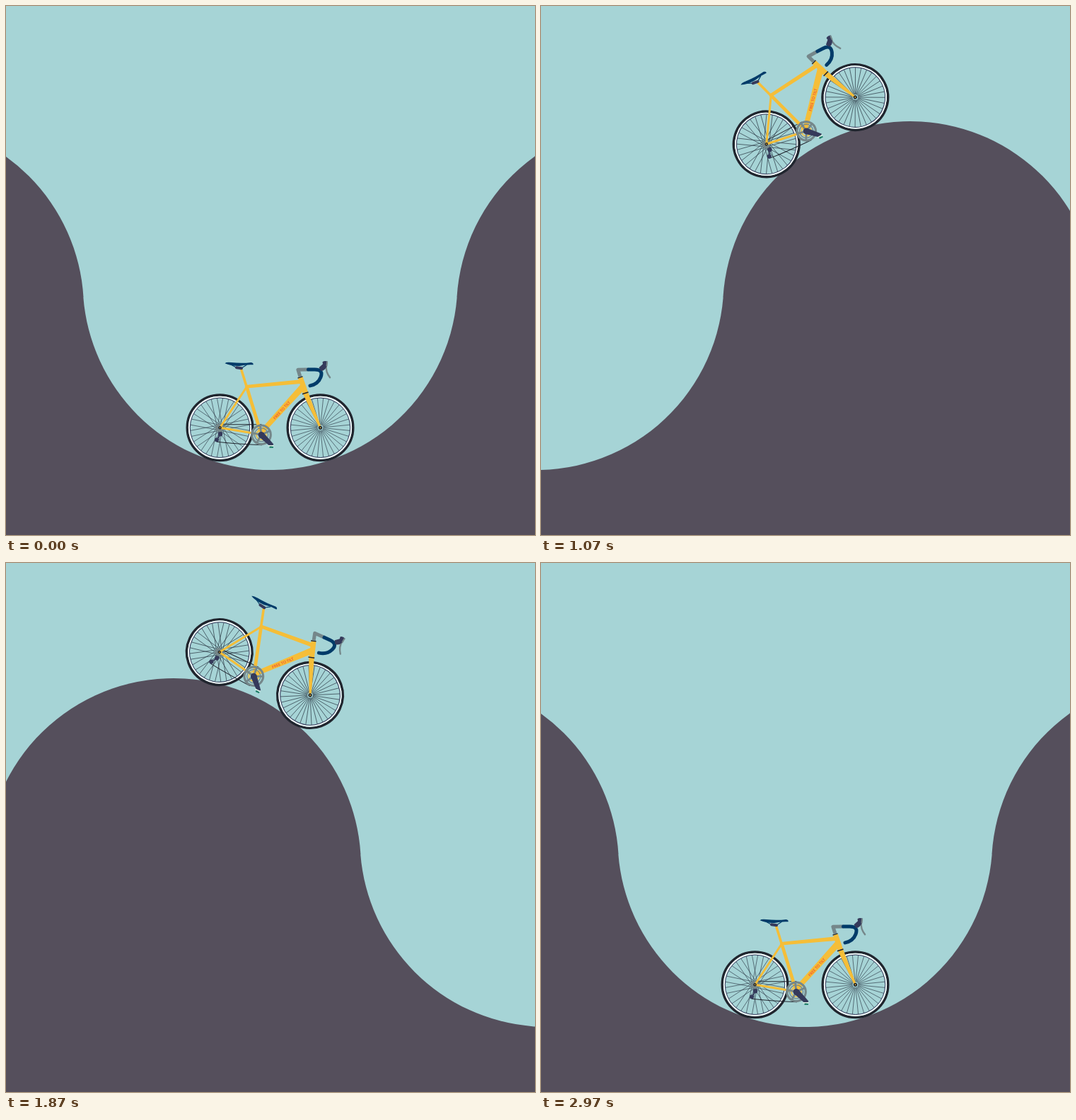
Write an HTML page with a canvas that moves like this. It is 748x748 px and loops after 3.03 s.

```html
<!DOCTYPE html>
<html lang="en">
<head>
<meta charset="utf-8">
<title>Bike on the hills</title>
<style>
html, body { margin: 0; width: 100%; height: 100%; overflow: hidden; background: #a6d4d6; }
canvas { display: block; width: 748px; height: 748px; }
</style>
</head>
<body>
<canvas id="stage" width="748" height="748"></canvas>
<script>
const ctx = document.getElementById('stage').getContext('2d');
const SIZE = 748, LOOP = 3030, LAST = 89, PERIOD = 1057, TAU = Math.PI * 2;
const SKY = '#a6d4d6', GROUND = '#554f5c', TYRE = '#20252e', YELLOW = '#f5be38';
const NAVY = '#003b69', GREY = '#75878a', INK = '#353a5b';

// Ground: hill and valley arcs meeting at SEAM
const RADIUS = 265, VALLEY_X = 373.5, VALLEY_Y = 391, HILL_Y = 428, SEAM = 412;

// Track followed by the wheel hubs
const LOW_R = 217.2, HIGH_R = 309, TURN = Math.atan2(PERIOD / 2, HILL_Y - VALLEY_Y);
const LOW_LEN = LOW_R * TURN, HALF = (LOW_R + HIGH_R) * TURN, TRACK = HALF * 2;
const AXLE = 72.3;

// [step, distance along the track]
const KEYS = [[-10, -172.4], [0, 0], [11, 174.5], [22, 495.2], [32, 639.6], [46, 804.3],
  [57, 940], [67, 1084.4], [79, 1407.2], [LAST, TRACK], [100, TRACK + 174.5]];

function slope(i) {
  const a = KEYS[i - 1], b = KEYS[i + 1];
  return (b[1] - a[1]) / (b[0] - a[0]);
}

function distance(n) {
  let i = 1;
  while (i < KEYS.length - 3 && n > KEYS[i + 1][0]) i++;
  const [n0, s0] = KEYS[i], [n1, s1] = KEYS[i + 1];
  const w = n1 - n0, u = (n - n0) / w, v = 1 - u;
  return s0 * v * v * (1 + 2 * u) + s1 * u * u * (3 - 2 * u)
    + w * u * v * (slope(i) * v - slope(i + 1) * u);
}

function hubAt(s, lift) {
  const k = Math.round(s / TRACK), d = s - k * TRACK;
  const side = Math.sign(d), len = Math.abs(d), x = VALLEY_X + k * PERIOD;
  if (len < LOW_LEN) {
    const a = len / LOW_R, r = LOW_R - (k > 0 ? lift * (2.4 + 3.5 * a) : 0);
    return [x + side * r * Math.sin(a), VALLEY_Y + r * Math.cos(a)];
  }
  const a = (HALF - len) / HIGH_R, r = HIGH_R + 3.7 * (a / TURN) ** 6;
  return [x + side * (PERIOD / 2 - r * Math.sin(a)), HILL_Y - r * Math.cos(a)];
}

function disc(x, y, r, color) {
  ctx.fillStyle = color;
  ctx.beginPath();
  ctx.arc(x, y, r, 0, TAU);
  ctx.fill();
}

function ring(x, y, r, width, color) {
  ctx.strokeStyle = color;
  ctx.lineWidth = width;
  ctx.beginPath();
  ctx.arc(x, y, r, 0, TAU);
  ctx.stroke();
}

function line(points, width, color, cap = 'butt') {
  ctx.strokeStyle = color;
  ctx.lineWidth = width;
  ctx.lineCap = cap;
  ctx.lineJoin = 'round';
  ctx.beginPath();
  points.forEach(p => ctx.lineTo(p[0], p[1]));
  ctx.stroke();
}

function curve(d, width, color) {
  ctx.strokeStyle = color;
  ctx.lineWidth = width;
  ctx.lineCap = 'round';
  ctx.stroke(new Path2D(d));
}

function shape(d, color) {
  ctx.fillStyle = color;
  ctx.fill(new Path2D(d));
}

// Tube with a different width at each end
function tube(x0, y0, w0, x1, y1, w1, color) {
  const a = Math.atan2(y1 - y0, x1 - x0), c = Math.cos(a) / 2, s = Math.sin(a) / 2;
  ctx.fillStyle = color;
  ctx.beginPath();
  ctx.moveTo(x0 - s * w0, y0 + c * w0);
  ctx.lineTo(x1 - s * w1, y1 + c * w1);
  ctx.lineTo(x1 + s * w1, y1 - c * w1);
  ctx.lineTo(x0 + s * w0, y0 - c * w0);
  ctx.fill();
}

function ground(shift) {
  ctx.fillStyle = GROUND;
  ctx.fillRect(0, SEAM, SIZE, SIZE - SEAM);
  const low = Math.asin((SEAM - VALLEY_Y) / RADIUS);
  const high = Math.asin((SEAM - HILL_Y) / RADIUS);
  for (let k = -1; k <= 2; k++) {
    const x = VALLEY_X + k * PERIOD - shift;
    ctx.fillStyle = SKY;
    ctx.beginPath();
    ctx.arc(x, VALLEY_Y, RADIUS, low, Math.PI - low);
    ctx.fill();
    ctx.fillStyle = GROUND;
    ctx.beginPath();
    ctx.arc(x + PERIOD / 2, HILL_Y, RADIUS, Math.PI - high, TAU + high);
    ctx.fill();
  }
}

function wheel(x, y, skew) {
  const count = 32;
  for (let i = 0; i < count; i++) {
    const a = (i + 0.5) / count * TAU, b = a + (i % 2 ? skew : -skew);
    line([[x + 4 * Math.cos(b), y + 4 * Math.sin(b)],
      [x + 42 * Math.cos(a), y + 42 * Math.sin(a)]], 0.7, '#34434f');
  }
  ring(x, y, 46.3, 3.4, TYRE);
  ring(x, y, 43.6, 2, '#f3fafa');
  ring(x, y, 42.2, 1, INK);
}

function drivetrain() {
  line([[303, 591.5], [362, 591.5]], 1, TYRE);
  curve('M299 616 Q325 619 362 620.5', 1, TYRE);
  disc(302.5, 596, 6, GREY);
  line([[302, 597], [304, 605]], 3, GREY);
  line([[304, 605], [298.5, 613]], 1.8, INK, 'round');
  disc(303.5, 605, 3.2, INK);
  disc(298.5, 613.3, 3, INK);
}

function frame() {
  line([[341, 538], [303, 596]], 3, YELLOW);
  line([[303, 596], [360, 605.5]], 3.2, YELLOW);
  line([[333, 513], [341, 539]], 3.6, YELLOW);
  line([[340.5, 537], [361, 604]], 4.6, YELLOW);
  tube(340, 538, 4.6, 420, 530.5, 5.8, YELLOW);
  tube(362, 602, 6.6, 422, 536, 9, YELLOW);
  tube(416.8, 525, 7, 424, 547, 7.6, YELLOW);
  tube(424, 547, 7.6, 445, 596, 3, YELLOW);
  line([[413, 525.8], [420, 523.6]], 1.4, TYRE);
  line([[419.5, 548.5], [428, 545.8]], 1.5, TYRE);
  ctx.save();
  ctx.translate(390.5, 571.3);
  ctx.rotate(-0.835);
  ctx.fillStyle = '#f0562f';
  ctx.font = 'bold 5.3px Lato, sans-serif';
  ctx.textAlign = 'center';
  ctx.textBaseline = 'middle';
  ctx.fillText('FREE TO TILT', 0, 0.3);
  ctx.restore();
}

function crank() {
  const x = 361.5, y = 606;
  ring(x, y, 7, 1.6, YELLOW);
  for (let i = 0; i < 5; i++) {
    const a = 0.83 + i * TAU / 5;
    line([[x, y], [x + 13 * Math.cos(a), y + 13 * Math.sin(a)]], 2.8, GREY);
  }
  ring(x, y, 13.3, 3.2, GREY);
  ring(x, y, 9.6, 1.3, GREY);
  disc(x, y, 4.4, INK);
  tube(x, y, 8.6, 377, 621.5, 5.5, INK);
  line([[371, 621.5], [379, 621.5]], 1.6, '#d9f3e4');
  line([[373, 623.6], [378.5, 623.6]], 2, '#1d8068');
}

function cockpit() {
  line([[416.5, 524], [413.4, 514], [428, 513.6]], 5, GREY);
  curve('M428 513.6 H437 C446 513.6 448 518 445.5 524.5 C443 531 438 535 430.5 536.6', 5, NAVY);
  curve('M453.5 506 C452 515 455 520 458.6 525', 2.4, GREY);
  shape('M443 511 L448.5 506 L448 503 Q451 500.5 455.5 502.5 L454 509 Q452 515 446 516 Z', INK);
  line([[454.6, 502.5], [454, 509]], 2, GREY);
}

function saddle() {
  line([[319, 507], [327, 511.5], [334, 511.5], [341, 507]], 1.2, NAVY);
  line([[326.5, 511], [333.5, 512]], 4, INK, 'round');
  shape('M310 505 Q312 503 319 503.8 Q335 505.2 347 503.6 Q351 504.2 350 507 Q340 506.4 331 508.6 Q318 508.8 310 505 Z', NAVY);
}

function bike(n, shift) {
  const s = distance(n), lift = Math.max(0, 1 - Math.abs(n - 79) / 8);
  const [rx, ry] = hubAt(s - AXLE, lift), [fx, fy] = hubAt(s + AXLE, lift);
  ctx.save();
  ctx.translate((rx + fx) / 2 - shift, (ry + fy) / 2);
  ctx.rotate(Math.atan2(fy - ry, fx - rx));
  ctx.translate(-374, -596);
  wheel(303, 596, 1.1);
  wheel(445, 596, 0);
  drivetrain();
  frame();
  disc(303, 596, 2.2, TYRE);
  disc(303, 596, 0.8, YELLOW);
  disc(445, 596, 2.6, TYRE);
  disc(445, 596, 0.9, YELLOW);
  crank();
  cockpit();
  saddle();
  ctx.restore();
}

// Thirty steps a second, on a 10 ms clock, resting on the last one
function stepAt(t) {
  return Math.min(LAST, Math.floor((Math.floor(t / 10) * 10 + 4) * 0.03));
}

function draw(now) {
  const n = stepAt(now % LOOP), shift = n * PERIOD / LAST;
  ctx.fillStyle = SKY;
  ctx.fillRect(0, 0, SIZE, SIZE);
  ground(shift);
  bike(n, shift);
}

let start = null;
function tick(now) {
  if (start === null) start = now;
  draw(now - start);
  requestAnimationFrame(tick);
}
draw(0);
requestAnimationFrame(tick);
</script>
</body>
</html>
```
